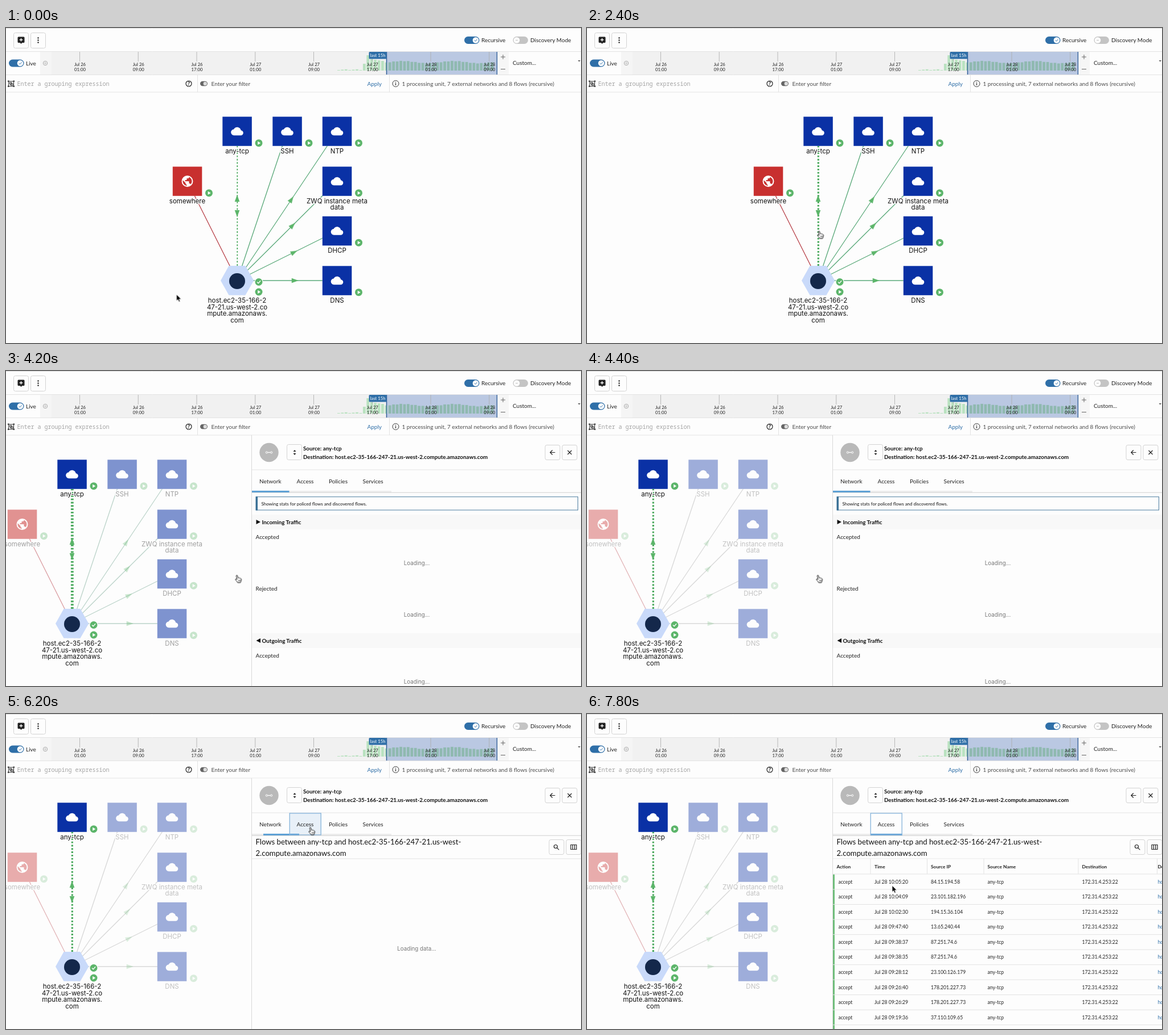
Animation, 1010 px wide and 555 px high, one loop 8000 ms. Source, as an HTML page:

```html
<!DOCTYPE html>
<html lang="en">
<head>
<meta charset="utf-8">
<title>Network flows</title>
<style>
html, body { margin: 0; width: 100%; height: 100%; overflow: hidden; background: #fdfdfd; }
svg { display: block; width: 1010px; height: 555px; }
text { font: 10px Lato, sans-serif; fill: #222; white-space: pre; }
text.mid { text-anchor: middle; }
text.axis { font-size: 7.7px; text-anchor: middle; }
text.mono { font: 10px "Noto Sans Mono", monospace; fill: #a3a3a3; }
text.bold { font-weight: 700; font-size: 9.78px; fill: #111; }
text.note { font-size: 7.95px; fill: #111; }
text.wait { font: 9.75px Inter, sans-serif; fill: #777; text-anchor: middle; }
text.title { font-size: 13.15px; fill: #111; }
text.head { font-size: 8.4px; font-weight: 700; }
text.cell { font-size: 8.65px; }
text.label { font: 11.5px Inter, sans-serif; fill: #111; text-anchor: middle;
  stroke: #fdfdfd; stroke-width: 3px; paint-order: stroke; }
.blue { fill: #2f6fa8 !important; }
.btn { fill: #fdfdfd; stroke: #d3d3d3; }
.rule { stroke: #e3e3e3; }
.ink { fill: none; stroke: #222; stroke-width: 1.2; }
.thin { stroke-width: .9; }

/* every timeline is cut into 200 ms steps (2.5%) */
.shift, .dim, .faint, .grey, .words, .flow, .panel, .wait-net, .charts, .net, .access,
.table, .underline, .hover, .arrow, .hand { animation: 8s step-end infinite; }
.cursor { animation: cursor 8s infinite; }
.shift { animation-name: shift; }
.dim { animation-name: dim; }
.faint { animation-name: faint; }
.grey { animation-name: grey; }
.words { animation-name: words; }
.flow { animation-name: flow; }
.panel { animation-name: panel; }
.wait-net { animation-name: waitNet; }
.charts { animation-name: charts; }
.net { animation-name: net; }
.access { animation-name: access; }
.table { animation-name: table; }
.underline { animation-name: underline; }
.hover { animation-name: hover; }
.arrow { animation-name: arrow; }
.hand { animation-name: hand; }

@keyframes shift { 0% { transform: none } 52.5%, 100% { transform: translateX(-290px) } }
@keyframes dim { 0% { opacity: 1 } 52.5% { opacity: .52 } 55%, 100% { opacity: .39 } }
@keyframes faint { 0% { opacity: 1 } 52.5% { opacity: .33 } 55%, 100% { opacity: .22 } }
@keyframes grey { 0% { opacity: 1 } 52.5% { opacity: .45; stroke: #6a9f8a } 55%, 100% { opacity: .38; stroke: #999 } }
@keyframes words { 0% { fill-opacity: 1 } 52.5% { fill-opacity: .4 } 55%, 100% { fill-opacity: .25 } }
@keyframes flow {
  0% { stroke-width: 1.8px } 22.5% { stroke-width: 3.2px }
  52.5% { stroke-width: 4.8px } 55%, 100% { stroke-width: 3.2px }
}
@keyframes panel { 0% { opacity: 0 } 52.5%, 100% { opacity: 1 } }
@keyframes waitNet { 0% { opacity: 1 } 57.5%, 100% { opacity: 0 } }
@keyframes charts { 0% { opacity: 0 } 57.5%, 100% { opacity: 1 } }
@keyframes net { 0% { opacity: 1 } 77.5%, 100% { opacity: 0 } }
@keyframes access { 0% { opacity: 0 } 77.5%, 100% { opacity: 1 } }
@keyframes table { 0% { opacity: 0 } 82.5%, 100% { opacity: 1 } }
@keyframes underline {
  0% { x: 432px; width: 65.5px } 77.5% { x: 452px; width: 63px }
  80%, 100% { x: 498px; width: 55.5px }
}
@keyframes hover { 0% { opacity: 0 } 67.5% { opacity: 1 } 85%, 100% { opacity: 0 } }
@keyframes arrow {
  0% { opacity: 1 } 22.5% { opacity: 0 } 57.5% { opacity: 1 }
  67.5% { opacity: 0 } 85%, 100% { opacity: 1 }
}
@keyframes hand {
  0% { opacity: 0 } 22.5% { opacity: 1 } 57.5% { opacity: 0 }
  67.5% { opacity: 1 } 85%, 100% { opacity: 0 }
}
@keyframes cursor {
  0% { transform: translate(299.5px, 469.5px); animation-timing-function: step-end }
  10% { transform: translate(299.5px, 469.5px); animation-timing-function: steps(5) }
  22.5% { transform: translate(407.5px, 357.5px); animation-timing-function: step-end }
  40% { transform: translate(405.5px, 359.5px); animation-timing-function: step-end }
  55% { transform: translate(405.5px, 359.5px); animation-timing-function: steps(3) }
  62.5% { transform: translate(533.5px, 228.5px); animation-timing-function: steps(3) }
  70% { transform: translate(534.5px, 199.5px); animation-timing-function: step-end }
  82.5% { transform: translate(534.5px, 199.5px); animation-timing-function: steps(6) }
  97.5%, 100% { transform: translate(536px, 302.3px) }
}
</style>
</head>
<body>
<svg id="stage" viewBox="0 0 1010 555"></svg>
<script>
const GREEN = '#5cb56a', BLUE = '#0a31a5', RED = '#c8302f', ACCENT = '#2f6fa8';
const HOST = 'host.ec2-35-166-247-21.us-west-2.compute.amazonaws.com';
const CLOUD = 'M19.35 10.04C18.67 6.59 15.64 4 12 4 9.11 4 6.6 5.64 5.35 8.04 2.34 8.36 0 10.91 0 14c0 3.31 2.69 6 6 6h13c2.76 0 5-2.24 5-5 0-2.64-2.05-4.78-4.65-4.96z';
const GLOBE = 'M12 2a10 10 0 1 0 0 20 10 10 0 0 0 0-20zm-1 17.93c-3.95-.49-7-3.85-7-7.93 0-.62.08-1.21.21-1.79L9 15v1c0 1.1.9 2 2 2zm6.9-2.54c-.26-.81-1-1.39-1.9-1.39h-1v-3c0-.55-.45-1-1-1H8v-2h2c.55 0 1-.45 1-1V7h2c1.1 0 2-.9 2-2v-.41c2.93 1.19 5 4.06 5 7.41 0 2.08-.8 3.97-2.1 5.39z';

const text = (x, y, s, cls = '') => `<text x="${x}" y="${y}" class="${cls}">${s}</text>`;
const rect = (x, y, w, h, attrs) => `<rect x="${x}" y="${y}" width="${w}" height="${h}" ${attrs}/>`;
const line = (x1, y1, x2, y2, attrs = 'class="rule"') =>
  `<line x1="${x1}" y1="${y1}" x2="${x2}" y2="${y2}" ${attrs}/>`;
const circle = (x, y, r, attrs) => `<circle cx="${x}" cy="${y}" r="${r}" ${attrs}/>`;
const path = (d, attrs) => `<path d="${d}" ${attrs}/>`;
const group = (cls, ...parts) => `<g class="${cls}">${parts.join('')}</g>`;
const button = (x, y, w = 26, h = 27) => rect(x + .5, y + .5, w, h, 'rx="3" class="btn"');
const each = (n, fn) => Array.from({ length: n }, (_, i) => fn(i)).join('');

const toggle = (x, y, on) => {
  const cx = on ? x + 20 : x + 6.5;
  return rect(x, y - 6.5, 26.5, 13, `rx="6.5" fill="${on ? ACCENT : '#c4c4c4'}"`) +
    circle(cx, y, 5.3, 'fill="#fff"') +
    (on ? path(`M${cx - 2.3} ${y}l1.8 1.8 3-3.4`, `fill="none" stroke="${ACCENT}"`)
        : path(`M${cx - 2} ${y}h4`, 'stroke="#bbb"'));
};

function topBar() {
  return line(0, .5, 1010, .5, 'stroke="#dcdcdc"') + button(13, 8) + button(43, 8) +
    path('M22 15.5h9q1.5 0 1.5 1.5v7.5q0 1.5-1.5 1.5h-2.8l-1.7 2-1.7-2H22q-1.5 0-1.5-1.5V17q0-1.5 1.5-1.5z', 'fill="#222"') +
    path('M26.5 18v5.6M23.7 20.8h5.6', 'stroke="#fff" stroke-width="1.4"') +
    each(3, i => circle(56.5, 17.5 + 4 * i, 1.2, 'fill="#222"')) +
    toggle(805, 21.5, true) + text(835, 25, 'Recursive') +
    toggle(890.5, 21.5, false) + text(921, 25, 'Discovery Mode');
}

function histogram() {
  // half-hour bins; traffic starts late and settles inside the selection
  const height = i => i < 7 ? 1 + i % 3 * .6 : i === 7 ? 12 : i === 8 ? 27
    : i < 13 ? 29 - i : 14.5 + 2 * Math.sin(i * .45) + i % 2 * .7;
  return each(43, i => {
    const h = height(i);
    return rect(582 + 6.42 * i, 75 - h, 4.8, h, `fill="${i < 14 ? '#b9e2c0' : '#8fb9b0'}"`);
  });
}

function timeline() {
  const ticks = ['26 01', '26 09', '26 17', '27 01', '27 09', '27 17', '28 01', '28 09'];
  const edge = x => line(x, 42, x, 82, 'stroke="#315f98" stroke-width="1.5"');
  return rect(60, 42, 20, 40, 'fill="#f5f5f5"') + rect(80, 42, 783, 40, 'fill="#f1f1f1"') +
    toggle(5, 62, true) + text(35, 65.7, 'Live') +
    circle(69, 62, 3.7, 'fill="none" stroke="#aaa"') + circle(69, 62, 1.3, 'fill="none" stroke="#aaa" stroke-width=".7"') +
    rect(668, 42, 194.5, 40, 'fill="#bac8e2"') + histogram() + edge(668.5) + edge(862.5) +
    ticks.map((s, i) => {
      const x = 130 + 102.75 * i, [day, hour] = s.split(' ');
      return line(x - .5, 42, x - .5, 59, 'stroke="#aaa" stroke-width=".8"') +
        text(x, 67, 'Jul ' + day, 'axis') + text(x, 75.5, hour + ':00', 'axis');
    }).join('') +
    rect(637.5, 42, 31, 12.5, `rx="1.5" fill="${ACCENT}"`) +
    `<text x="653" y="51" class="axis" style="fill:#fff">last 15h</text>` +
    rect(863.5, 42, 19.5, 40, 'fill="#f6f6f6"') +
    path('M869 51h8M873 47v8M869 72.5h8', 'stroke="#555" stroke-width=".9"') +
    text(890, 65, 'Custom...') + path('M1004.5 57h4.5l-2.2 2.3z', 'fill="#444"') +
    line(0, 41.5, 1010, 41.5) + line(0, 82.5, 1010, 82.5);
}

function filterBar() {
  return rect(4.5, 94, 9, 8.5, 'class="ink thin"') +
    rect(6.5, 96, 3.5, 3, 'class="ink thin"') + rect(8.5, 98, 3.5, 3, 'class="ink thin"') +
    each(4, i => rect(3 + i % 2 * 9.5, 92.5 + (i >> 1) * 9, 2.5, 2.5, 'fill="#444"')) +
    text(19.5, 101.5, 'Enter a grouping expression', 'mono') +
    circle(321, 98, 5, 'class="ink"') + text(321, 101.2, '?', 'mid bold') +
    line(336.5, 83, 336.5, 113) + line(673.5, 83, 673.5, 113) +
    rect(341, 93.8, 13, 8.4, 'rx="4.2" fill="#666"') + circle(349.8, 98, 3.2, 'fill="#ddd"') +
    `<g opacity=".8">${text(360.5, 102, 'Enter your filter')}</g>` +
    text(634.5, 102, 'Apply', 'blue') +
    circle(684.5, 98, 5.5, 'class="ink thin"') +
    path('M684.5 97v4M684.5 94.7v1.2', 'stroke="#333" stroke-width="1.2"') +
    `<g opacity=".8">${text(695.5, 102, '1 processing unit, 7 external networks and 8 flows (recursive)')}</g>` +
    line(0, 113, 1010, 113);
}

const hub = [406, 445];
const nodes = [
  { at: [406, 182], label: ['any-tcp'], main: true },
  { at: [494, 182], label: ['SSH'] },
  { at: [581.5, 182], label: ['NTP'], arrow: true },
  { at: [581.5, 270], label: ['ZWQ instance meta', 'data'], arrow: true },
  { at: [581.5, 357.5], label: ['DHCP'], arrow: true },
  { at: [581.5, 445], label: ['DNS'], arrow: true },
  { at: [318.5, 270], label: ['somewhere'], red: true },
];

const badge = (x, y, check) => circle(x, y, 7.6, 'fill="#fdfdfd"') + circle(x, y, 6.5, `fill="${GREEN}"`) +
  (check ? path(`M${x - 3} ${y}l2.2 2.3 4-4.5`, 'fill="none" stroke="#fff" stroke-width="1.3"')
         : path(`M${x - 1.8} ${y - 3}l5 3-5 3z`, 'fill="#fff"'));

const labels = (x, y, lines, cls = '') => lines.map((s, i) => text(x, y + 11.7 * i, s, 'label ' + cls)).join('');

// arrowhead `offset` px past the middle of the edge
function arrowhead([x, y], offset) {
  const dx = x - hub[0], dy = y - hub[1], k = offset / Math.hypot(dx, dy);
  const turn = Math.atan2(dy, dx) * 180 / Math.PI + (offset < 0 ? 180 : 0);
  return path('M6 0L-6-4.3V4.3z', `fill="${GREEN}" transform="translate(${(x + hub[0]) / 2 + dx * k} ${(y + hub[1]) / 2 + dy * k}) rotate(${turn})"`);
}

function edge({ at, main, red, arrow }) {
  if (main) return line(406.3, 419, 406.3, 208, 'class="flow" stroke="#4aa95d" stroke-dasharray="2.9"') +
    arrowhead(at, 13.5) + arrowhead(at, -13.5);
  return line(...hub, ...at, `class="${red ? 'dim' : 'grey'}" stroke="${red ? '#b53a42' : '#58a878'}" stroke-width="1.3"`) +
    (arrow ? group('faint', arrowhead(at, 14)) : '');
}

function node({ at: [x, y], label, main, red }) {
  const box = fill => rect(x - 25.7, y - 25.7, 51.5, 51.5, `fill="${fill}"`);
  const icon = path(red ? GLOBE : CLOUD, `fill="#fff" transform="translate(${x} ${y}) scale(${red ? 1 : .9}) translate(-12 -12)"`);
  return box('#fdfdfd') + group(main ? '' : 'dim', box(red ? RED : BLUE), icon) +
    group(main ? '' : 'faint', badge(x + 38, y + 20.7)) + labels(x, y + 38.7, label, main ? '' : 'words');
}

function graph() {
  return group('shift', ...nodes.map(edge), ...nodes.map(node),
    path('M377 445l14.5-26h29l14.8 26-14.8 25.7h-29z', 'fill="#c9dafa"'),
    circle(406, 446, 14, 'fill="#14284b"'),
    badge(444, 447.5, true), badge(444, 465),
    labels(406, 484, ['host.ec2-35-166-2', '47-21.us-west-2.co', 'mpute.amazonaws.', 'com']));
}

function panelHead() {
  const tabs = { Network: 445, Access: 510.5, Policies: 567, Services: 626.5 };
  const knob = x => circle(x, 143.5, 1.6, 'fill="#b9b9b9" stroke="#fff"');
  return rect(432, 113.5, 578, 442, 'fill="#fdfdfd"') + line(431.5, 113, 431.5, 555, 'stroke="#d9d9d9"') +
    circle(462, 143.5, 16.7, 'fill="#b9b9b9"') + line(458, 143.5, 466, 143.5, 'stroke="#fff" stroke-width="1.3"') +
    knob(457.8) + knob(466.2) +
    button(493, 129) + path('M504.5 142l2.5-3 2.5 3zM504.5 145l2.5 3 2.5-3z', 'fill="#222"') +
    text(522, 140, 'Source: any-tcp', 'bold') + text(522, 154.5, 'Destination: ' + HOST, 'bold') +
    button(946.5, 130, 26, 26) + path('M964.5 143.5h-8.5m3.8-4l-4 4 4 4', 'class="ink"') +
    button(976.5, 130, 26, 26) + path('M986.5 140l7 7m0-7l-7 7', 'class="ink"') +
    line(432, 174, 1010, 174) +
    rect(498, 175, 55.5, 38, 'class="hover" fill="#e8f0f8"') +
    rect(432, 211, 245, 3, 'fill="#ededed"') + line(432, 214.2, 1010, 214.2, 'stroke="#cfcfcf"') +
    rect(432, 210.9, 65.5, 3, 'class="underline" fill="#5a9fd4"') +
    rect(498.2, 174.9, 55, 38, 'class="access" fill="none" stroke="#85b3da" stroke-width="1.3"') +
    Object.entries(tabs).map(([s, x]) => text(x, 197.5, s)).join('');
}

function donut(x, y, share) {
  const ring = (color, from, len) => circle(x, y, 30.3,
    `fill="none" stroke="${color}" stroke-width="5" pathLength="360" stroke-dasharray="${len} 360" transform="rotate(${from} ${x} ${y})"`);
  return circle(x, y, 33, 'fill="none" stroke="#d5ebd9" stroke-width="1.2"') +
    ring('#4f9cb0', 1, 360 * (1 - share)) + ring(GREEN, 360 * (1 - share) + 1, 360 * share - 2);
}

function networkTab() {
  const section = (y, s, mark) => rect(432, y, 578, 26, 'fill="#f8f8f8"') + path(mark, 'fill="#111"') + text(449.5, y + 17, s, 'bold');
  const bar = (x, top, w, bottom = 357) => rect(x, top, w, bottom - top, `fill="${GREEN}"`) + rect(x, top - 1, w, 1, 'fill="#cfe9d3"');
  return group('net',
    rect(439.5, 221.7, 565, 23.3, 'fill="#fdfdfd" stroke="#4b7c9f"'),
    rect(438.5, 221.2, 3.5, 24.3, 'fill="#3a7196"'),
    text(448.5, 236.5, 'Showing stats for policed flows and discovered flows.', 'note'),
    section(253, 'Incoming Traffic', 'M439.5 262l7.5 4-7.5 4z'),
    section(462, 'Outgoing Traffic', 'M447 471l-7.5 4 7.5 4z'),
    text(438.5, 295.5, 'Accepted'), text(438.5, 386.7, 'Rejected'), text(438.5, 504.5, 'Accepted'),
    group('wait-net', ...[342, 433, 551].map(y => text(721.5, y, 'Loading...', 'wait'))),
    group('charts', text(721.5, 433, 'No traffic', 'wait'),
      donut(476, 337.5, .17), donut(476, 546.5, 1),
      bar(528, 308, 5.5), bar(666.5, 342, 10.5), rect(528, 356.5, 473, 10, `fill="${GREEN}"`),
      rect(911, 356, 20, 4.5, 'fill="#e2f2e4"'), line(528, 367, 1001, 367, 'stroke="#8b9a8e"'),
      bar(767, 544, 10.5, 555), bar(868, 517, 5.5, 555), bar(889, 553, 5, 555), bar(894, 530, 33, 555)));
}

function accessTab() {
  const columns = { Action: 438.5, Time: 505, 'Source IP': 604, 'Source Name': 703.5, Destination: 869.5, 'Destination Name': 1002.5 };
  const flows = ['10:05:20 84.15.194.58', '10:04:09 23.101.182.196', '10:02:30 194.15.36.104', '09:47:40 13.65.240.44',
    '09:38:37 87.251.74.6', '09:38:35 87.251.74.6', '09:28:12 23.100.126.179', '09:26:40 178.201.227.73',
    '09:26:29 178.201.227.73', '09:19:36 37.110.109.65'];
  const row = (flow, i) => {
    const y = 298.8 + 26.53 * i, [time, ip] = flow.split(' ');
    return text(441.5, y, 'accept', 'cell') + text(505, y, 'Jul 28 ' + time, 'cell') + text(604, y, ip, 'cell') +
      text(703.5, y, 'any-tcp', 'cell') + text(869.5, y, '172.31.4.253:22', 'cell') +
      text(1002.5, y, HOST, 'cell blue') + line(432, y + 10.2, 1010, y + 10.2);
  };
  return group('access',
    text(438.5, 229.7, 'Flows between any-tcp and host.ec2-35-166-247-21.us-west-', 'title'),
    text(438.5, 249.7, '2.compute.amazonaws.com', 'title'),
    button(953.5, 221, 26, 26), circle(965.5, 233.5, 3, 'class="ink"'), path('M967.8 235.8l3.5 3.5', 'class="ink"'),
    button(983.5, 221, 26, 26), path('M992 230.5h10v8h-10zM995.3 230.5v8M998.7 230.5v8', 'class="ink"'),
    line(432, 255, 1010, 255),
    text(721.5, 417, 'Loading data...', 'wait'),
    group('table', rect(432, 255.5, 578, 300, 'fill="#fdfdfd"'),
      ...Object.entries(columns).map(([s, x]) => text(x, 272, s, 'head')),
      ...[498, 597.5, 697, 863, 1001.5].map(x => line(x, 255, x, 282)),
      rect(432.2, 282.5, 2.6, 273, `fill="${GREEN}"`),
      line(432, 282, 1010, 282), ...flows.map(row)));
}

const cursor = () => group('cursor',
  path('M0 0V11.3l2.6-2.4 1.8 4.2 2-.9-1.8-4h3.7z', 'class="arrow" fill="#000" stroke="#fff" stroke-width=".8"'),
  path('M-1.2 1.2Q0-.8 1.2 1.2L2.2 5.2Q3.5 4.3 4.3 5.4 5.6 4.7 6.3 6q1.5 0 1.5 1.8 0 3-1.3 5.2H1.2Q0 10.8-2.6 8.3-3 6.8-1 7L.3 7.8z',
    'class="hand" fill="#fff" stroke="#111" stroke-linejoin="round"'),
  path('M3 8.5v2.5M4.7 8.5v2.5M6.2 8.5v2.5', 'class="hand" stroke="#111" stroke-width=".7"'));

document.getElementById('stage').innerHTML = graph() + topBar() + timeline() + filterBar() +
  group('panel', panelHead(), networkTab(), accessTab()) + cursor();
</script>
</body>
</html>
```
